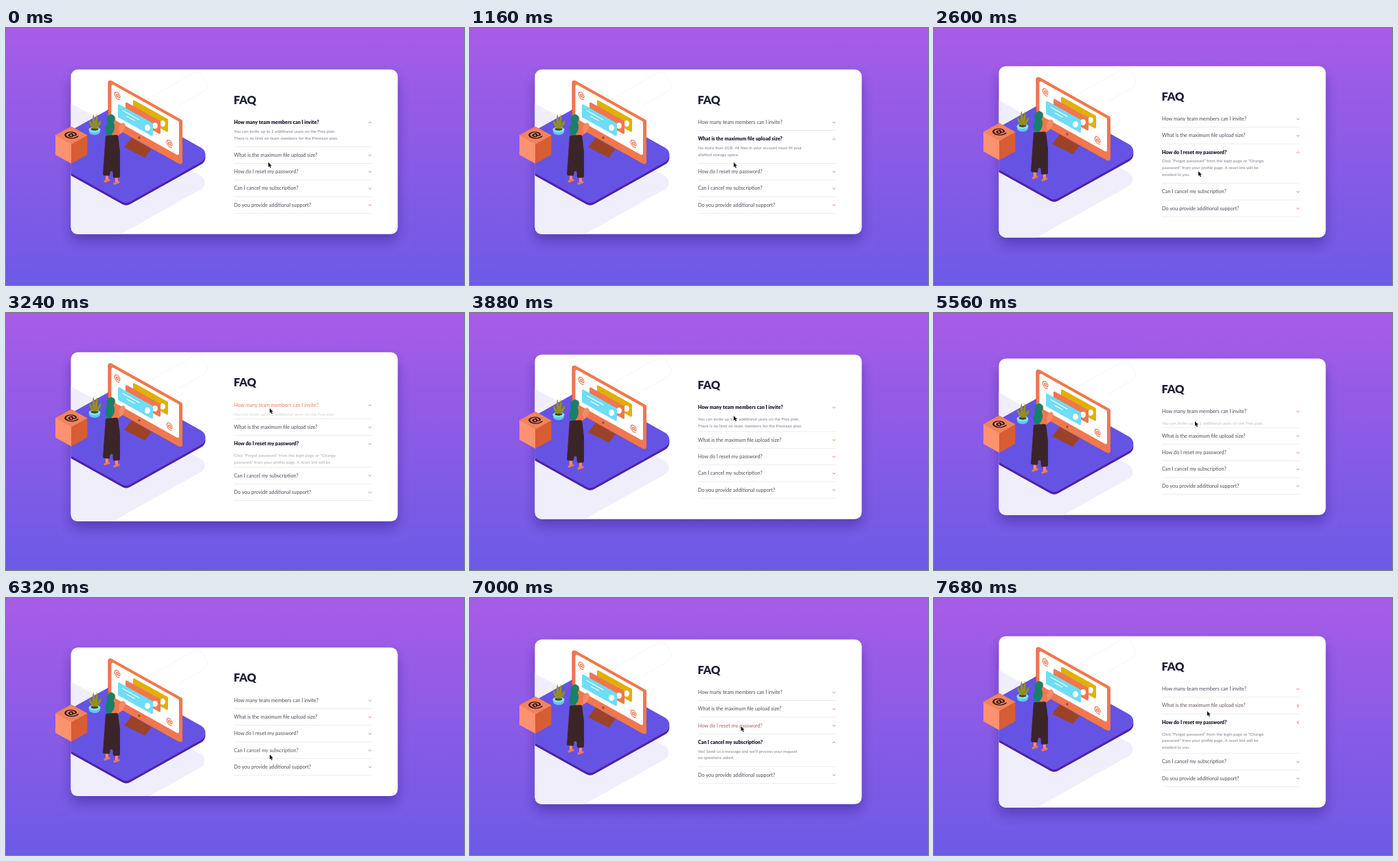
Animation, 667 px wide and 375 px high, one loop 7720 ms. Source, as an HTML page with a canvas:

```html
<!DOCTYPE html>
<html lang="en">
<head>
<meta charset="utf-8">
<title>FAQ accordion</title>
<style>
  html, body { margin: 0; width: 100%; height: 100%; overflow: hidden; background: #8a5ae6; }
  canvas { display: block; width: 667px; height: 375px; }
</style>
</head>
<body>
<canvas id="stage" width="667" height="375"></canvas>
<script>
const ctx = document.getElementById('stage').getContext('2d');
const LOOP = 7720, OPEN_TIME = 320, TURN_TIME = 40, HOVER_TIME = 120;
const LEFT = 332, ROW = 24.3, LINE = 9.8, SLOPE = .56;
const CARD = { x: 94.5, w: 476, mid: 180.7, h: 216.8, r: 10 };
const FONT = 'Lato, "Open Sans", sans-serif';
const ORANGE = '#f0784e', SKIN = '#f58b68';

const items = [
  ['How many team members can I invite?',
    'You can invite up to 2 additional users on the Free plan.', 'There is no limit on team members for the Premium plan.'],
  ['What is the maximum file upload size?',
    'No more than 2GB. All files in your account must fit your', 'allotted storage space.'],
  ['How do I reset my password?',
    'Click \u201cForgot password\u201d from the login page or \u201cChange', 'password\u201d from your profile page. A reset link will be', 'emailed to you.'],
  ['Can I cancel my subscription?',
    'Yes! Send us a message and we\u2019ll process your request', 'no questions asked.'],
  ['Do you provide additional support?']
].map(([q, ...a]) => ({ q, a, grow: 3.9 + LINE * a.length, toggles: [] }));

// [time, item]: a click toggles its item and closes any other
const clicks = [[-1000, 0], [680, 1], [2280, 2], [3100, 0], [3840, 0], [4720, 0], [5400, 0], [6420, 3], [7100, 2], [7660, 1]];
let active = -1;
for (const [time, i] of clicks) {
  if (active >= 0) items[active].toggles.push(time);
  active = active === i ? -1 : i;
  if (active >= 0) items[i].toggles.push(time);
}

// pointer stops: [arrival, x, y]
const stops = [
  [0, 382, 196], [280, 384, 193], [1000, 384, 196], [1440, 385, 226], [2000, 385, 209], [3000, 384, 139],
  [3560, 384, 150], [4640, 380, 158], [5960, 384, 235], [6380, 384, 226], [7060, 395, 186], [7740, 398, 163]
];

const clamp = v => Math.max(0, Math.min(1, v));
const ease = p => p < .5 ? 4 * p ** 3 : 1 - (2 - 2 * p) ** 3 / 2;
const mix = (a, b, k) => a + (b - a) * k;
const blend = (a, b, k) => `rgb(${a.map((v, i) => Math.round(mix(v, b[i], k)))})`;

function pointerAt(t) {
  let [, x, y] = stops[0];
  for (const [arrive, toX, toY] of stops) {
    const travel = Math.min(400, 100 + 5 * Math.hypot(toX - x, toY - y));
    const k = ease(clamp((t - arrive + travel) / travel));
    x = mix(x, toX, k);
    y = mix(y, toY, k);
    if (k < 1) break;
  }
  return [x, y];
}

function itemState({ toggles, grow }, t) {
  const past = toggles.filter(v => v <= t);
  const opening = past.length % 2 === 1;
  const since = past.length ? t - past[past.length - 1] : Infinity;
  const way = v => opening ? v : 1 - v;
  const open = way(ease(clamp(since / OPEN_TIME)));
  return { open, extra: grow * open, turn: way(clamp(since / TURN_TIME)), closing: !opening };
}

function layout(t) {
  const rows = items.map(item => itemState(item, t));
  const h = CARD.h + rows.reduce((sum, row) => sum + row.extra, 0);
  const top = CARD.mid - h / 2;
  let y = top + 77;
  for (const row of rows) {
    row.y = y;
    y += ROW + row.extra;
  }
  return { rows, top, h };
}

// share of the last moments in which the pointer was over each title
function hoverLevels(t) {
  const steps = 6, levels = items.map(() => 0);
  for (let k = 0; k < steps; k++) {
    const past = t - k * HOVER_TIME / steps;
    const y = pointerAt(past)[1];
    layout(past).rows.forEach((row, i) => { if (Math.abs(y - row.y) < 9) levels[i] += 1 / steps; });
  }
  return levels;
}

function fill(color) {
  ctx.fillStyle = color;
  ctx.fill();
}

function shape(color, r, pts) {
  const n = pts.length, last = pts[n - 1];
  ctx.beginPath();
  ctx.moveTo((pts[0][0] + last[0]) / 2, (pts[0][1] + last[1]) / 2);
  pts.forEach((p, i) => ctx.arcTo(...p, ...pts[(i + 1) % n], r));
  ctx.closePath();
  fill(color);
}

// flat isometric plate: top corner, lengths to the right and to the left
function plate(color, x, y, a, b, r) {
  shape(color, r, [[x, y], [x + a, y + a * SLOPE], [x + a - b, y + (a + b) * SLOPE], [x - b, y + b * SLOPE]]);
}

// upright isometric wall; dir 1 falls to the right, -1 rises
function wall(color, x, y, w, h, r = 0, dir = 1) {
  const drop = w * SLOPE * dir;
  shape(color, r, [[x, y], [x + w, y + drop], [x + w, y + drop + h], [x, y + h]]);
}

function oval(color, x, y, rx, ry, turn = 0) {
  ctx.beginPath();
  ctx.ellipse(x, y, rx, ry, turn, 0, 7);
  fill(color);
}

function line(color, width, ...pts) {
  ctx.beginPath();
  pts.forEach(p => ctx.lineTo(...p));
  ctx.strokeStyle = color;
  ctx.lineWidth = width;
  ctx.lineCap = ctx.lineJoin = 'round';
  ctx.stroke();
}

function text(str, x, y, size, color, weight = 400) {
  ctx.font = `${weight} ${size}px ${FONT}`;
  ctx.fillStyle = color;
  ctx.fillText(str, x, y);
}

function atSign(color, size, x, y, ...axes) {
  ctx.save();
  ctx.transform(...axes, x, y);
  ctx.textAlign = 'center';
  ctx.textBaseline = 'middle';
  text('@', 0, 0, size, color, 900);
  ctx.restore();
}

function drawFloor() {
  plate('#f0eefa', 80, 102, 221, 300, 11);
  ctx.beginPath();
  ctx.moveTo(200, 107);
  ctx.arcTo(280, 62, 291, 74, 11);
  ctx.arcTo(297, 88, 252, 113, 11);
  ctx.lineTo(252, 113);
  ctx.strokeStyle = '#f3f1f8';
  ctx.lineWidth = .8;
  ctx.stroke();
  plate('#4d22a8', 167, 112.5, 136, 128, 12);
  plate('#6553e3', 167, 109, 136, 128, 12);
}

function drawMonitor() {
  shape('#9c4327', 0, [[172, 174], [183, 160], [212, 177], [202, 189]]);
  wall('#d95f38', 148.5, 74.5, 106, 66, 3);
  wall(ORANGE, 149.5, 74.5, 107.5, 66, 3);
  wall('#fff', 153.5, 81.5, 98.5, 50, 2);
  oval('#9c4327', 194, 160, 1.5, 1.8);
  atSign(ORANGE, 13, 162, 98.5, .87, .48, 0, 1);
  atSign(ORANGE, 13, 238, 168.5, .87, .48, 0, 1);
  ['#e0b008', ORANGE, '#6fdcf8'].forEach((color, k) => {
    const x = 185 - 11 * k, y = 104.5 + 3 * k;
    wall(color, x, y, 51, 19.5, 1.5);
    oval('#fff', x + 43, y + 35, 4, 4.5);
  });
  line('#fff', 1.2, [170, 120.5], [194, 134]);
  line('#fff', 1.2, [176, 129], [187, 135]);
}

function drawWoman() {
  line(SKIN, 4, [160, 157], [168, 151], [172, 142]);
  oval(SKIN, 168.5, 146, 4, 8, .35);
  oval(ORANGE, 159, 152, 6, 8);
  for (const [x, y] of [[147, 216], [161, 219]]) {
    line(SKIN, 4.2, [x, y], [x, y + 6]);
    line(ORANGE, 3.2, [x + 3, y + 6], [x - 3, y + 8]);
  }
  shape('#3c2528', 2, [[145, 157], [163, 156], [166, 180], [166, 218], [156, 219], [154, 186], [151, 216], [141, 215]]);
  oval(SKIN, 157, 133, 2.5, 5);
  oval('#168268', 152.5, 133.5, 6, 7.5, .3);
  oval('#168268', 151.5, 146.5, 6.5, 10.5, .25);
}

function drawPlant() {
  oval('#5bc8e6', 129, 151.5, 8, 4.8);
  oval('#7fe4fa', 129, 148.5, 8.6, 4);
  oval('#4b3a20', 129, 147.5, 5.5, 2.2);
  for (let k = -1.5; k <= 1.5; k++) {
    const tip = [130 + 5.6 * k, 124.5 + 4.4 * k * k], x = 129.5 + k, y = 138 + 2 * Math.abs(k);
    ctx.beginPath();
    ctx.moveTo(x, 148);
    ctx.quadraticCurveTo(x + 3 * k - 4, y, ...tip);
    ctx.quadraticCurveTo(x + 3 * k + 4, y, x, 148);
    fill('#94930f');
  }
}

function drawCube() {
  wall('#fc9270', 72, 156, 23.3, 29);
  wall('#d85c34', 95, 169, 23.5, 29, 0, -1);
  plate('#f4835a', 95, 143.5, 23.5, 23, 0);
  atSign('#2b1a24', 23, 94.5, 156.5, .86, -.3, .62, .46);
}

function drawChevron(y, turn) {
  ctx.save();
  ctx.translate(530, y + .3);
  ctx.rotate(Math.PI * turn);
  line('#ee7d5c', 1, [-1.8, -.9], [0, .9], [1.8, -.9]);
  ctx.restore();
}

function drawItem({ q, a }, { y, open, extra, turn, closing }, hover) {
  const bold = open > .5;
  const color = bold ? '#15152a' : blend([75, 76, 92], [240, 123, 86], hover);
  text(q, LEFT, y + 2.5, bold ? 7.15 : 7.28, color, bold ? 900 : 400);
  drawChevron(y, turn);
  ctx.fillStyle = '#e8e8ed';
  ctx.fillRect(LEFT, y + extra + 11.7, 200.5, .8);
  if (!open) return;
  ctx.save();
  ctx.beginPath();
  ctx.rect(LEFT - 2, y + 5, 210, extra + 7);
  ctx.clip();
  ctx.globalAlpha = open;
  a.forEach((str, n) => text(str, LEFT, y + 15.2 + n * LINE + (closing ? 4.2 : 0), 6.1, '#7e7e8c'));
  ctx.restore();
}

function drawPointer([x, y]) {
  ctx.save();
  ctx.translate(x, y);
  ctx.beginPath();
  [[0, 0], [0, 7], [1.6, 5.6], [2.8, 8.2], [4, 7.6], [2.9, 5.1], [5, 5]].forEach(p => ctx.lineTo(...p));
  ctx.closePath();
  ctx.strokeStyle = '#fff';
  ctx.lineWidth = 1;
  ctx.stroke();
  fill('#111');
  ctx.restore();
}

function drawCard(top, h) {
  const g = ctx.createLinearGradient(0, 0, 0, 375);
  g.addColorStop(0, '#a85ce6');
  g.addColorStop(1, '#6c5ae6');
  ctx.fillStyle = g;
  ctx.fillRect(0, 0, 667, 375);

  ctx.save();
  ctx.beginPath();
  ctx.roundRect(CARD.x, top, CARD.w, h, CARD.r);
  ctx.shadowColor = 'rgba(50, 30, 140, .48)';
  ctx.shadowBlur = 18;
  ctx.shadowOffsetY = 10;
  fill('#fff');
  ctx.shadowColor = 'transparent';
  ctx.clip();
  ctx.translate(0, top - 60.6);
  drawFloor();
  ctx.restore();
}

function draw(t) {
  const { rows, top, h } = layout(t);
  const hover = hoverLevels(t);
  drawCard(top, h);

  ctx.save();
  ctx.translate(0, top - 60.6);
  drawMonitor();
  drawPlant();
  drawWoman();
  drawCube();
  ctx.restore();

  text('FAQ', LEFT - .6, top + 50, 16.5, '#1e1f36', 900);
  items.forEach((item, i) => drawItem(item, rows[i], hover[i]));
  drawPointer(pointerAt(t));
}

const start = performance.now();
function tick(now) {
  draw(Math.max(0, now - start) % LOOP);
  requestAnimationFrame(tick);
}
draw(0);
requestAnimationFrame(tick);
</script>
</body>
</html>
```
